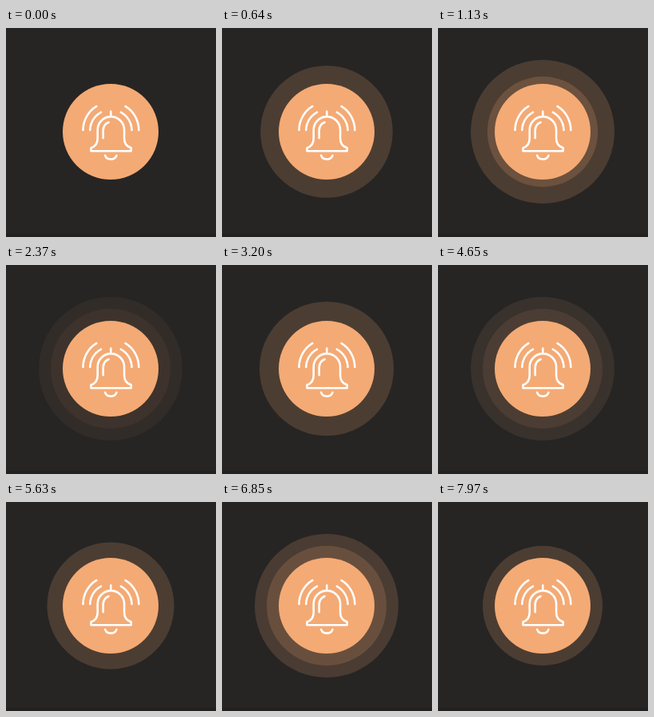
These frames come from a looping animation (263 px wide and 262 px high, 8 s). An HTML page with a canvas:

```html
<!DOCTYPE html>
<html lang="en">
<head>
<meta charset="utf-8">
<title>Alarm bell pulse</title>
<style>
  html, body { margin: 0; width: 100%; height: 100%; overflow: hidden; background: #262524; }
  canvas { display: block; width: 263px; height: 262px; }
</style>
</head>
<body>
<canvas id="stage"></canvas>
<script>
const W = 263, H = 262, LOOP = 8000;
const CX = 131, CY = 130, DISC_R = 60;
const OUTER = { grow: 30, ms: 700 };
const INNER = { grow: 15, ms: 490 };
const FADE_MS = 780, RING_ALPHA = 0.185;
const ORANGE = '#f4aa74';

// Start times of each pulse: outer ring, inner ring, fade-out
const pulses = [
  { outer: 110, inner: 890, fade: 1820 },
  { outer: 2640, inner: 3330, fade: 4270 },
  { outer: 5175, inner: 5900, fade: 6820 },
  { outer: 7620, inner: 8350, fade: 9270 }
];

const canvas = document.getElementById('stage');
const ctx = canvas.getContext('2d');
const dpr = window.devicePixelRatio || 1;
canvas.width = Math.round(W * dpr);
canvas.height = Math.round(H * dpr);
ctx.scale(dpr, dpr);

const bell = new Path2D(
  'M131.3 104.5V111' +
  'M106.5 154.3V150.3C112 148.5 114.7 144.5 114.7 138.5V127.8' +
  'A16.7 16.7 0 0 1 148.1 127.8V138.5C148.1 144.5 151 148.5 156.7 150.3V154.3Z' +
  'M121.7 138V128.5C121.7 123.5 124.3 119.8 128.5 118.2' +
  'M124.2 159.8C126.2 166 136.4 166 138.4 159.8'
);

const waves = new Path2D(
  'M105.3 128A26 26 0 0 1 119 105.6' +
  'M96.5 128A34.8 34.8 0 0 1 113.3 98.2' +
  'M157.5 128A26 26 0 0 0 143.8 105.6' +
  'M166.3 128A34.8 34.8 0 0 0 149.5 98.2'
);

const progress = (t, start, ms) => Math.min(1, Math.max(0, (t - start) / ms));
const easeOut = p => 1 - Math.pow(1 - p, 1.4);

function disc(r, alpha) {
  ctx.globalAlpha = alpha;
  ctx.fillStyle = ORANGE;
  ctx.beginPath();
  ctx.arc(CX, CY, r, 0, Math.PI * 2);
  ctx.fill();
  ctx.globalAlpha = 1;
}

function drawRings(t) {
  for (const p of pulses) {
    const alpha = RING_ALPHA * (1 - progress(t, p.fade, FADE_MS));
    if (t < p.outer || alpha <= 0) continue;
    disc(DISC_R + OUTER.grow * progress(t, p.outer, OUTER.ms), alpha);
    if (t > p.inner) {
      disc(DISC_R + INNER.grow * easeOut(progress(t, p.inner, INNER.ms)), alpha);
    }
  }
}

function drawBell() {
  ctx.strokeStyle = '#fff';
  ctx.lineWidth = 2.6;
  ctx.lineCap = 'round';
  ctx.lineJoin = 'round';
  ctx.stroke(bell);
  ctx.stroke(waves);
}

function draw(t) {
  ctx.fillStyle = '#262524';
  ctx.fillRect(0, 0, W, H);
  ctx.fillStyle = '#222120';
  ctx.fillRect(0, 258, W, 4);
  drawRings(t);
  disc(DISC_R, 1);
  drawBell();
}

const begin = performance.now();
function tick() {
  draw((performance.now() - begin) % LOOP);
  requestAnimationFrame(tick);
}
tick();
</script>
</body>
</html>
```
